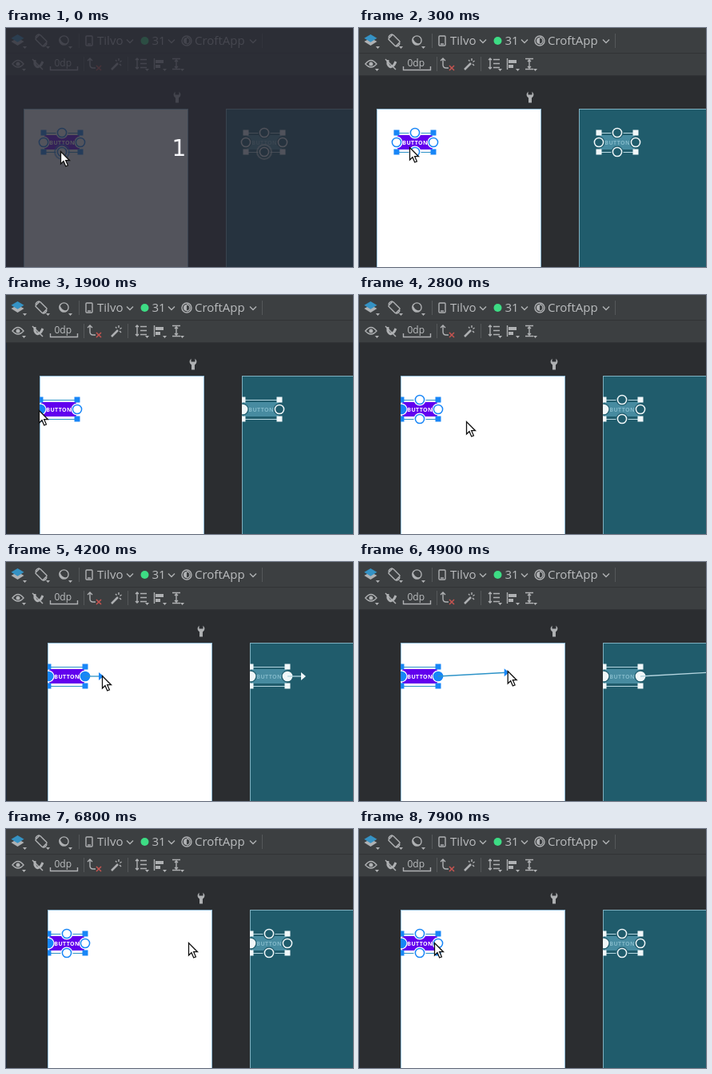
An HTML page that plays this animation: 434 by 299 pixels, repeating every 8 s.

```html
<!DOCTYPE html>
<html lang="en">
<head>
<meta charset="utf-8">
<title>Layout editor</title>
<style>
  html, body { margin: 0; width: 100%; height: 100%; overflow: hidden; background: #2b2d30; }
  svg { display: block; width: 100vw; height: 100vh; }
  .bar { font: 15px "Open Sans", "Noto Sans", sans-serif; fill: #bbbdbf; }
  .label { font: bold 7px "Noto Sans", sans-serif; letter-spacing: .4px; text-anchor: middle; }
  .count { font: 28px "DejaVu Sans", sans-serif; text-anchor: middle; fill: #f8f8fc; }
  .line { fill: none; stroke: #afb1b3; stroke-width: 1.4; }
  .solid { fill: #afb1b3; }
</style>
</head>
<body>
<svg id="stage" viewBox="0 0 434 299"></svg>
<script>
const LOOP = 8000, STEP = 100;
const PAGE_W = 206, TOP = 101, MID = 143, BTN_W = 46, GAP = 253;
const stage = document.getElementById("stage");

const line = d => `<path class="line" d="${d}"/>`;
const solid = d => `<path class="solid" d="${d}"/>`;
const corner = (x, y) => solid(`M${x - 3} ${y}h5l-2.5 3z`);
const chevron = x => line(`M${x - 4} 14.5l4 4l4-4`);
const divider = (x, y) => `<path d="M${x} ${y}v18" stroke="#55585a"/>`;

function toolbar() {
  return `
    <rect width="434" height="60" fill="#3c3f41"/>
    <path d="M0 31.5H434M0 59.5H434" stroke="#313335"/>
    <path d="M14.5 12.5l8 4.5l-8 5l-8-5z" fill="#afb1b3"/>
    <path d="M14.5 8l8 4.8l-8 5l-8-5z" fill="#3592c4"/>
    ${corner(24, 23)}
    <rect x="40" y="9" width="8" height="13" rx="1" class="line" transform="rotate(-45 44 15.5)"/>
    ${line("M37 12q1-4 5-4M51 19q-1 4-5 4")}${corner(53, 23)}
    <circle cx="72.500" cy="15.500" r="5.600" class="line"/>
    <path class="solid" d="M68 11a6 6 0 1 0 9 8a7 7 0 0 1-9-8z"/>${corner(81, 23)}
    ${divider(91.5, 7)}
    <rect x="100" y="10" width="8" height="12" rx="1" class="line"/>${line("M102 20h4")}
    <text class="bar" x="114" y="21">Tilvo</text>${chevron(155)}
    <circle cx="173.500" cy="16" r="5" fill="#3ddc84"/>
    <text class="bar" x="182.500" y="21">31</text>${chevron(207)}
    <circle cx="226" cy="16" r="6" class="line"/>
    <path class="solid" d="M226 12a4 4 0 0 0 0 8z"/><path d="M226 12a4 4 0 0 1 0 8" class="line"/>
    <text class="bar" x="236" y="21">CroftApp</text>${chevron(309)}
    ${divider(320.5, 7)}

    ${line("M8 45q7-9 14 0q-7 8-14 0z")}<circle cx="15" cy="45" r="2.500" class="solid"/>${corner(23, 51)}
    <path d="M36 40v5q3 7 8 1l2-4" fill="none" stroke="#afb1b3" stroke-width="3"/>
    ${line("M33 39l13 13")}
    <text class="bar" x="60.500" y="48" style="font-size:12px">0dp</text>
    ${line("M55.500 48v4.500H89.500V48")}
    ${divider(97.5, 36)}
    ${line("M105 39v7q0 4 4 4h3M102 41l3-3l3 3")}
    <path d="M113 47l6 6m0-6l-6 6" stroke="#c75450" stroke-width="1.500"/>
    <path d="M132 52l8-8" stroke="#afb1b3" stroke-width="2.500"/>
    ${line("M141 38v3M144.500 41l-2 1.500M137 40l1.500 1.500M142 45l2 2")}
    ${divider(152.5, 36)}
    ${line("M164 38v13M162 40l2-2l2 2M162 49l2 2l2-2M168 39.500h8M168 44.500h8M168 49.500h8")}${corner(177, 51)}
    ${line("M185.500 38v14")}${solid("M187 40h10v4h-10zM187 46h6v4h-6z")}${corner(199, 51)}
    ${line("M208 38.500h10M208 51.500h10M213 40v10M211 42l2-2l2 2M211 48l2 2l2-2")}${corner(221, 51)}`;
}

// Design surface and blueprint share one drawing, with different palettes.
const DESIGN = {
  id: "design", dx: 0, page: "#fff", edge: "#8fb9d3", ink: "#1886f7",
  frame: "#2d93c8", button: "#6200ee", text: "#fff", hollow: "#fff"
};
const BLUEPRINT = {
  id: "blueprint", dx: GAP, page: "#205c6c", edge: "#7fb0c0", ink: "#f0f7f9",
  frame: "#b4d5df", button: "#478ba0", text: "#82b9c9", hollow: "#205c6c"
};

function anchor(c, x, y, filled, hover) {
  const halo = hover
    ? `<circle cx="${x}" cy="${y}" r="9" fill="none" stroke="${c.ink}" stroke-width="2" opacity=".6"/>` : "";
  return `<circle cx="${x}" cy="${y}" r="7.600" fill="${c.page}"/>${halo}
    <circle cx="${x}" cy="${y}" r="5.600" fill="${filled ? c.ink : c.hollow}" stroke="${c.ink}" stroke-width="1.500"/>`;
}

function arrow(c, x, y, tip) {
  if (!tip) return "";
  const tx = tip[0] + c.dx, ty = tip[1];
  return `<path d="M${x} ${y}L${tx - 3} ${ty}" stroke="${c.frame}" stroke-width="1.300"/>
    <path d="M${tx} ${ty}l-6-5v10z" fill="${c.ink}"/>`;
}

function surface(c, s) {
  const x = s.page + c.dx, l = s.left + c.dx, r = l + BTN_W, m = l + BTN_W / 2;
  const handles = [l, r].flatMap(hx => [131, 155].map(hy =>
    `<rect x="${hx - 3.5}" y="${hy - 3.5}" width="7" height="7" fill="${c.ink}"/>`)).join("");
  const vertical = s.drag ? "" :
    anchor(c, m, 131, false, false) + anchor(c, m, 155, false, s.hover === "bottom");
  return `<clipPath id="${c.id}"><rect x="${x}" y="${TOP}" width="${PAGE_W}" height="200"/></clipPath>
    <rect x="${x + .5}" y="${TOP + .5}" width="${PAGE_W - 1}" height="220" fill="${c.page}" stroke="${c.edge}"/>
    <g clip-path="url(#${c.id})">
      <rect x="${l + 1}" y="134" width="${BTN_W - 2}" height="18" rx="1.500" fill="${c.button}"/>
      <text class="label" x="${m + .2}" y="145.600" fill="${c.text}">BUTTON</text>
      <path d="M${l} 131.500H${r}M${l} 155.500H${r}" stroke="${c.frame}"/>
      ${handles}${vertical}
      ${anchor(c, l, MID, s.linked, s.hover === "left")}
      ${anchor(c, r, MID, s.drag === "right", s.hover === "right")}
      ${arrow(c, s.drag === "right" ? r : l, MID, s.tip)}
    </g>`;
}

const wrench = x => `<g transform="translate(${x} 79)">
  <path class="solid" d="M-2.500 .5v4h5v-4q4 4.500-.5 8v6h-4v-6q-4.500-3.500-.5-8z"/></g>`;

const pointer = ([x, y]) => `<path transform="translate(${x} ${y})"
  d="M.5 .5v15.500l3.500-3.300l2.700 6.300l2.700-1.200l-2.700-6.100h4.800z" fill="#fff" stroke="#111" stroke-width="1.300"/>`;

// Pointer tip: time, x, y
const PATH = [
  [0, 68, 154], [300, 63, 149], [400, 63, 149], [500, 52, 149], [600, 52, 149],
  [900, 46, 144], [1600, 46, 144], [1900, 41, 144], [2300, 41, 145], [2600, 56, 148],
  [2700, 56, 148], [2800, 134, 158], [3000, 131, 161], [3200, 118, 158],
  [3300, 118, 158], [3700, 99, 144], [3900, 99, 144], [4200, 120, 142],
  [4800, 177, 137], [5100, 203, 134], [5600, 236, 142], [5700, 237, 143],
  [6000, 228, 145], [6700, 228, 145], [6800, 228, 142], [7200, 80, 140],
  [7300, 80, 140], [7900, 94, 142], [8000, 94, 142]
];

function pointerAt(t) {
  const i = PATH.findIndex(k => k[0] > t);
  const [t0, x0, y0] = PATH[i - 1], [t1, x1, y1] = PATH[i];
  const k = (t - t0) / (t1 - t0);
  return [x0 + (x1 - x0) * k, y0 + (y1 - y0) * k];
}

const within = (t, a, b) => t >= a && t < b;

function hoverAt(t) {
  if (t < 200) return "bottom";
  if (within(t, 800, 1600) || within(t, 2500, 2800)) return "left";
  if (within(t, 3500, 4000)) return "right";
  return "";
}

function stateAt(t) {
  const page = t < 1600 ? 22 : Math.min(52, 27 + (t - 1600) / 20);
  const left = page + (t < 1900 ? 25 : 1);
  const drag = within(t, 1600, 2500) ? "left" : within(t, 4000, 6300) ? "right" : "";
  const tipOf = ([x, y]) => [x + 2, y + 1 + 2.5 * Math.min(1, Math.max(0, (t - 4200) / 1400))];
  const mouse = pointerAt(t);
  let tip = null;
  if (drag === "right") tip = tipOf(mouse);
  if (within(t, 1600, 1900)) tip = [left + 9, MID + 2];
  return { page, left, drag, mouse, tip, linked: t >= 1600, hover: hoverAt(t) };
}

stage.innerHTML = `<rect width="434" height="299" fill="#2b2d30"/>
  <rect y="60" width="1" height="239" fill="#1f2a3a"/>${toolbar()}<g id="scene"></g>`;
const scene = document.getElementById("scene");

function draw(t) {
  const s = stateAt(t);
  const fade = Math.max(0, 1 - t / 300);
  const veil = fade ? `<rect width="434" height="299" fill="#282a34" opacity="${.8 * fade}"/>
    <text class="count" x="216.500" y="160" opacity="${fade}">1</text>` : "";
  scene.innerHTML = surface(DESIGN, s) + surface(BLUEPRINT, s) +
    wrench(s.page + 192) + veil + pointer(s.mouse);
}

let shown = -1;
const start = performance.now();
function tick() {
  const t = Math.floor((performance.now() - start) % LOOP / STEP) * STEP;
  if (t !== shown) draw(shown = t);
  requestAnimationFrame(tick);
}
tick();
</script>
</body>
</html>
```
